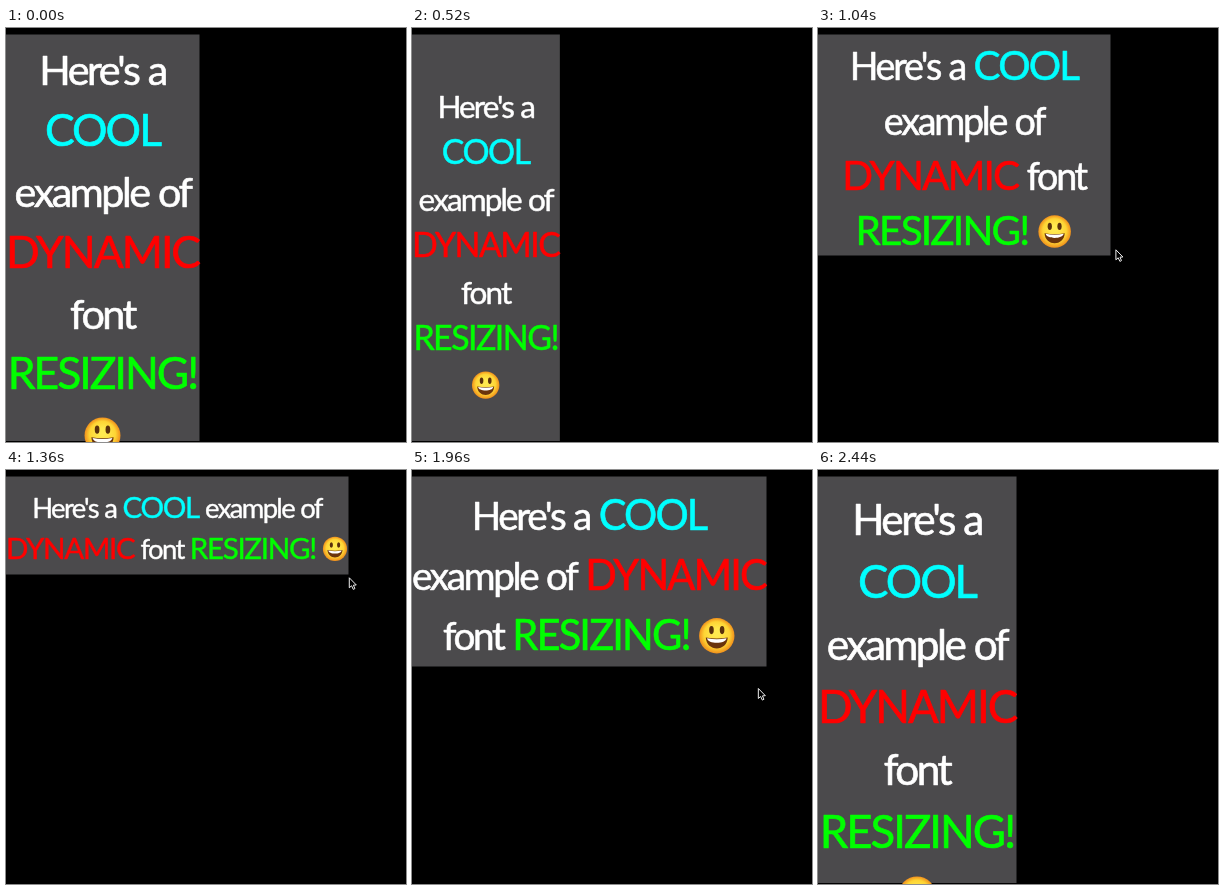
Animation, 400 px wide and 414 px high, one loop 2480 ms. Source, as an HTML page with a canvas:

```html
<!DOCTYPE html>
<html lang="en">
<head>
<meta charset="utf-8">
<title>Dynamic font resizing</title>
<style>
  html, body { margin: 0; width: 100%; height: 100%; overflow: hidden; background: #000; }
  canvas { display: block; }
</style>
</head>
<body>
<canvas id="stage" width="400" height="414"></canvas>
<script>
const ctx = document.getElementById('stage').getContext('2d');
const LOOP = 2480, STEP = 40, TOP = 6.5, FLOOR = 413;
const POINTER_LEAD = 32;
const SMILEY = ':D';
const COLORS = { COOL: '#00ffff', DYNAMIC: '#ff0000', 'RESIZING!': '#00ff00' };

// Possible wraps; span is the widest line in line heights.
const WRAPS = [
  { span: 3.17, text: "Here's a|COOL|example of|DYNAMIC|font|RESIZING!|:D" },
  { span: 3.9, text: "Here's a|COOL|example of|DYNAMIC|font|RESIZING! :D" },
  { span: 4.12, text: "Here's a COOL|example of|DYNAMIC font|RESIZING! :D" },
  { span: 5.9, text: "Here's a COOL|example of DYNAMIC|font RESIZING! :D" },
  { span: 8.34, text: "Here's a COOL example of|DYNAMIC font RESIZING! :D" }
].map(({ span, text }) => ({ span, lines: text.split('|').map(line => line.split(' ')) }));

// Key points of the dragged corner.
const CORNER = [
  { t: 0, x: 193, y: 434 },
  { t: 240, x: 114, y: 441 },
  { t: 560, x: 155, y: 415 },
  { t: 760, x: 209, y: 341 },
  { t: 1040, x: 292, y: 227 },
  { t: 1360, x: 342, y: 104 },
  { t: 1660, x: 346, y: 122 },
  { t: 1960, x: 354, y: 196 },
  { t: 2440, x: 198, y: 459 }
];

// Key point by index, repeating with the loop.
function keyAt(i) {
  const n = CORNER.length, key = CORNER[(i + n) % n];
  return { ...key, t: key.t + Math.floor(i / n) * LOOP };
}

function slope(i, axis) {
  const a = keyAt(i - 1), b = keyAt(i + 1);
  return (b[axis] - a[axis]) / (b.t - a.t);
}

// Smooth closed curve through the key points.
function cornerAt(time) {
  const t = time % LOOP;
  let i = 0;
  while (keyAt(i + 1).t <= t) i++;
  const a = keyAt(i), b = keyAt(i + 1), d = b.t - a.t, u = (t - a.t) / d;
  const ease = u * u * (3 - 2 * u);
  const along = axis => a[axis] + (b[axis] - a[axis]) * ease +
    d * u * (1 - u) * ((1 - u) * slope(i, axis) - u * slope(i + 1, axis));
  return { x: along('x'), y: along('y') };
}

// Colored capitals are set slightly larger than the white words.
function setFont(word, size) {
  const colored = word in COLORS, em = colored ? size : size * 0.93;
  ctx.font = `400 ${em}px Lato, "Open Sans", sans-serif`;
  ctx.letterSpacing = `${em * (colored ? -0.045 : -0.06)}px`;
}

function wordWidth(word, size) {
  if (word === SMILEY) return size * 0.88;
  setFont(word, size);
  return ctx.measureText(word).width;
}

const gap = size => size * 0.21;

function lineWidth(words, size) {
  return words.reduce((sum, word) => sum + wordWidth(word, size), (words.length - 1) * gap(size));
}

function ellipse(x, y, rx, ry, fill) {
  ctx.beginPath();
  ctx.ellipse(x, y, rx, ry, 0, 0, Math.PI * 2);
  ctx.fillStyle = fill;
  ctx.fill();
}

// Shape between an upper and a lower curve, mirrored about x = 0.
function smile(halfWidth, top, depth, fill) {
  ctx.beginPath();
  ctx.moveTo(-halfWidth, top);
  ctx.quadraticCurveTo(0, top + 0.12, halfWidth, top);
  ctx.bezierCurveTo(halfWidth * 0.94, top + depth, -halfWidth * 0.94, top + depth, -halfWidth, top);
  ctx.fillStyle = fill;
  ctx.fill();
}

function drawSmiley(x, y, r) {
  ctx.save();
  ctx.translate(x, y);
  ctx.scale(r, r);
  const skin = ctx.createRadialGradient(0, -0.2, 0.2, 0, 0, 1);
  skin.addColorStop(0, '#ffe94f');
  skin.addColorStop(0.65, '#fed434');
  skin.addColorStop(1, '#f0901c');
  ellipse(0, 0, 1, 1, skin);
  for (const side of [-1, 1]) ellipse(side * 0.3, -0.32, 0.13, 0.23, '#5a300c');
  smile(0.62, 0.1, 0.82, '#6a340c');
  smile(0.55, 0.14, 0.34, '#fff');
  ctx.restore();
}

function drawLine(words, center, middle, pitch, size) {
  let x = center - lineWidth(words, size) / 2;
  for (const word of words) {
    const width = wordWidth(word, size);
    if (word === SMILEY) {
      drawSmiley(x + width / 2, middle + pitch * 0.02, pitch * 0.295);
    } else {
      setFont(word, size);
      ctx.fillStyle = ctx.strokeStyle = COLORS[word] || '#fff';
      ctx.lineWidth = size * 0.015;
      ctx.lineJoin = 'round';
      ctx.fillText(word, x, middle + pitch * 0.265);
      ctx.strokeText(word, x, middle + pitch * 0.265);
    }
    x += width + gap(size);
  }
}

function drawPointer(x, y) {
  ctx.save();
  ctx.translate(x, y);
  ctx.strokeStyle = '#eee';
  ctx.lineWidth = 1;
  ctx.stroke(new Path2D('M0 0V10L2.3 8L4 11.6L5.6 10.8L4.1 7.4L7 7.2Z'));
  ctx.restore();
}

function draw(t) {
  const { x: width, y: bottom } = cornerAt(t);
  const height = bottom - TOP;
  const pitchOf = wrap => Math.min(height / wrap.lines.length, width / wrap.span);
  const { lines } = WRAPS.reduce((a, b) => pitchOf(b) > pitchOf(a) ? b : a);
  const pitch = Math.max(...WRAPS.map(pitchOf));

  ctx.fillStyle = '#000';
  ctx.fillRect(0, 0, 400, 414);
  ctx.fillStyle = '#4b4a4c';
  ctx.fillRect(0, TOP, width + 0.5, Math.min(bottom + 0.5, FLOOR) - TOP);

  let size = pitch * 0.735;
  const widest = Math.max(...lines.map(words => lineWidth(words, size)));
  size *= Math.min(1, width / widest);
  const first = TOP + height / 2 + pitch * (0.055 - (lines.length - 1) / 2);
  lines.forEach((words, i) => drawLine(words, width / 2, first + i * pitch, pitch, size));

  const lead = cornerAt(t + POINTER_LEAD);
  drawPointer(lead.x - 1, lead.y + 8);
}

const start = performance.now();
function tick() {
  const t = (performance.now() - start) % LOOP;
  draw(Math.floor(t / STEP) * STEP);
  requestAnimationFrame(tick);
}
tick();
</script>
</body>
</html>
```
